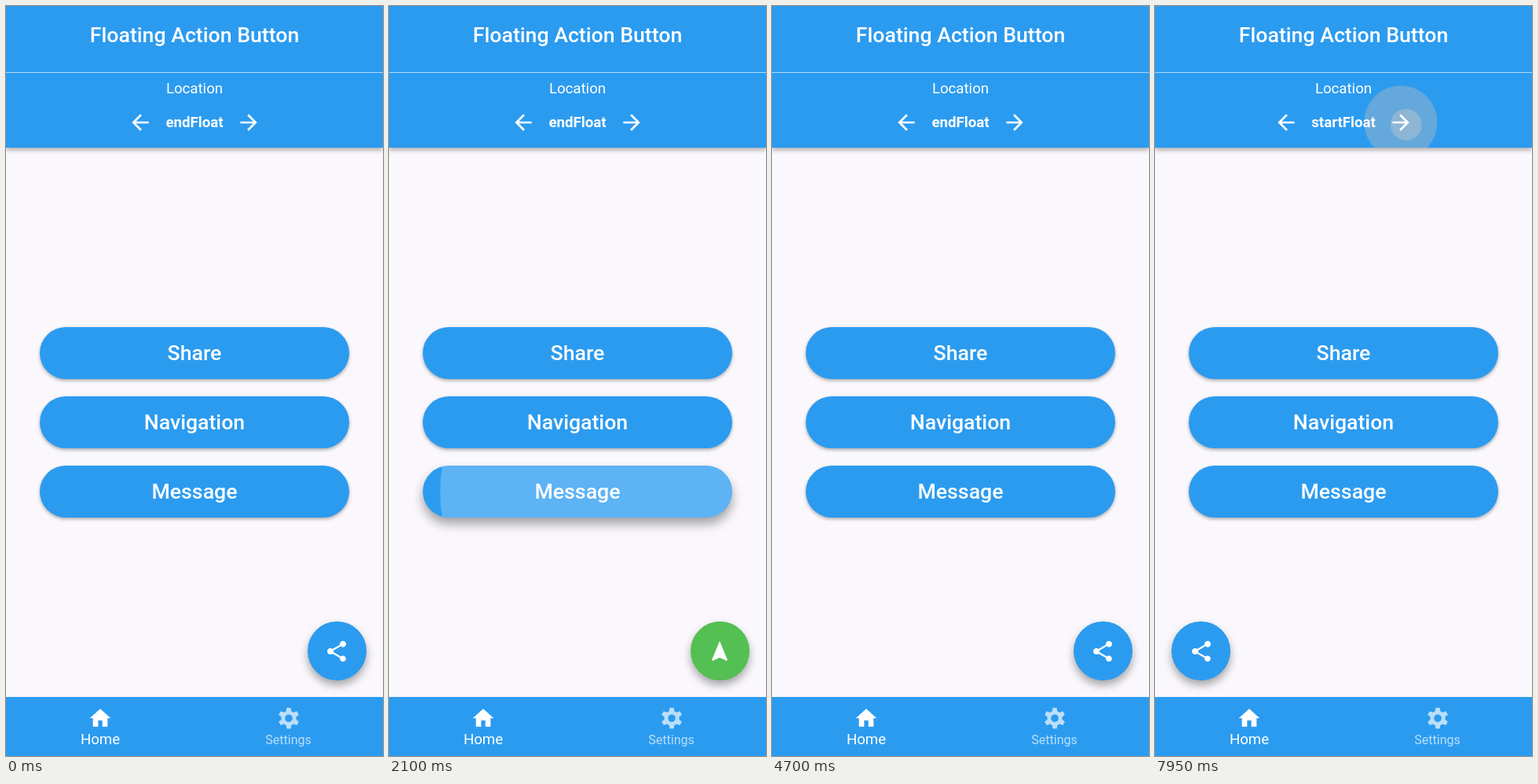
Recreate the animation shown at these times as an HTML page. Size 480x953 px, loop 8000 ms.

```html
<!DOCTYPE html>
<html lang="en">
<head>
<meta charset="utf-8">
<title>Floating Action Button</title>
<style>
  :root { --blue: #2b9bf0; --green: #54bf52; }
  html, body { margin: 0; width: 100%; height: 100%; overflow: hidden; }
  body { background: #faf8fc; color: #fff; font: 18.667px Roboto, sans-serif; }
  #stage { position: relative; width: 480px; height: 953px; overflow: hidden; }
  #stage div { position: absolute; }
  svg { display: block; width: 32px; height: 32px; fill: #fff; }

  .bar { left: 0; width: 480px; background: var(--blue); }
  .line { left: 0; width: 100%; text-align: center; white-space: nowrap; }
  #head { top: 0; height: 180px; overflow: hidden; isolation: isolate; box-shadow: 0 3px 6px rgba(0,0,0,.32); }
  #title { top: 17px; font-size: 26.667px; font-weight: 500; line-height: 40px; }
  #rule { top: 84px; left: 0; width: 100%; height: 1px; background: rgba(255,255,255,.62); }
  #place { top: 95px; line-height: 21px; }
  #row { top: 116px; left: 0; width: 100%; height: 64px; display: flex; justify-content: center; align-items: center; font-weight: 700; }
  #row .arrow { position: relative; width: 64px; height: 64px; }
  .arrow svg { margin: 16px; }
  .ink { left: 0; top: 0; border-radius: 50%; z-index: -1; }

  .button { left: 42.667px; width: 394.667px; height: 66.667px; border-radius: 34px; background: var(--blue); }
  .clip { inset: 0; border-radius: inherit; overflow: hidden; }
  .clip .ink { background: #fff; z-index: 0; }
  .button .line { top: 0; font-size: 26.667px; font-weight: 500; line-height: 67.5px; }

  #fab { box-shadow: 0 6px 11px rgba(0,0,0,.34); }
  #fabIcon { left: 21.333px; }
  #fabText { left: 64px; top: 0; line-height: 64px; font-weight: 500; letter-spacing: 1.6px; }

  #foot { top: 878.333px; height: 75px; }
  .tab { top: 0; width: 240px; height: 75px; }
  .tab svg { margin: 10.4px auto 0; }
</style>
</head>
<body>
<div id="stage">
  <div id="head" class="bar">
    <div id="title" class="line">Floating Action Button</div>
    <div id="rule"></div>
    <div id="place" class="line">Location</div>
    <div id="row">
      <div class="arrow"><svg viewBox="0 0 24 24"><path d="M20 11H7.83l5.59-5.59L12 4l-8 8 8 8 1.41-1.41L7.83 13H20v-2z"/></svg></div>
      <span id="label">endFloat</span>
      <div class="arrow">
        <div id="glow" class="ink" style="background:#bcbcbc"></div>
        <div id="splash" class="ink" style="background:#c8c8c8"></div>
        <svg viewBox="0 0 24 24"><path d="M12 4l-1.41 1.41L16.17 11H4v2h12.17l-5.58 5.59L12 20l8-8z"/></svg>
      </div>
    </div>
  </div>

  <div class="button" style="top:407.667px"><div class="clip"><div class="ink"></div></div><div class="line">Share</div></div>
  <div class="button" style="top:495.667px"><div class="clip"><div class="ink"></div></div><div class="line">Navigation</div></div>
  <div class="button" style="top:583.667px"><div class="clip"><div class="ink"></div></div><div class="line">Message</div></div>

  <div id="fab">
    <div id="fabIcon"><svg viewBox="0 0 24 24"><path id="fabPath"/></svg></div>
    <div id="fabText">Message</div>
  </div>

  <div id="foot" class="bar">
    <div class="tab" style="left:0">
      <svg viewBox="0 0 24 24"><path d="M10 20v-6h4v6h5v-8h3L12 3 2 12h3v8z"/></svg>
      <div class="line" style="top:43px;line-height:22px">Home</div>
    </div>
    <div class="tab" style="left:239.5px;opacity:.68">
      <svg viewBox="0 0 24 24" id="gear"><circle cx="12" cy="12" r="5.4" fill="none" stroke="#fff" stroke-width="3.6"/></svg>
      <div class="line" style="top:45px;line-height:20px;font-size:16px">Settings</div>
    </div>
  </div>
</div>

<script>
const LOOP = 8000;
const $ = id => document.getElementById(id);
const clamp = x => Math.min(1, Math.max(0, x));
const mix = (a, b, k) => a + (b - a) * k;

// cubic-bezier(.25, .1, .25, 1)
function ease(x) {
  if (x <= 0 || x >= 1) return clamp(x);
  let lo = 0, hi = 1, u;
  for (let i = 0; i < 24; i++) {
    u = (lo + hi) / 2;
    if (.75 * u * (1 - u) + u ** 3 < x) lo = u; else hi = u;
  }
  return .3 * u * (1 - u) ** 2 + 3 * u * u * (1 - u) + u ** 3;
}

const icons = {
  share: 'M18 16.08c-.76 0-1.44.3-1.96.77L8.91 12.7c.05-.23.09-.46.09-.7s-.04-.47-.09-.7l7.05-4.11c.54.5 1.25.81 2.04.81 1.66 0 3-1.34 3-3s-1.34-3-3-3-3 1.34-3 3c0 .24.04.47.09.7L8.04 9.81C7.5 9.31 6.79 9 6 9c-1.66 0-3 1.34-3 3s1.34 3 3 3c.79 0 1.5-.31 2.04-.81l7.12 4.16c-.05.21-.08.43-.08.65 0 1.61 1.31 2.92 2.92 2.92s2.92-1.31 2.92-2.92-1.31-2.92-2.92-2.92z',
  navigation: 'M12 2L4.5 20.29l.71.71L12 18l6.79 3 .71-.71z',
  message: 'M20 2H4c-1.1 0-1.99.9-1.99 2L2 22l4-4h14c1.1 0 2-.9 2-2V4c0-1.1-.9-2-2-2zm-2 12H6v-2h12v2zm0-3H6V9h12v2zm0-3H6V6h12v2z'
};

const buttonPresses = [
  { button: 1, down: 380, up: 630, x: 250, fab: 'navigation' },
  { button: 2, down: 1490, up: 2380, x: 344, fab: 'message' },
  { button: 0, down: 3290, up: 4130, x: 220, fab: 'share' }
];
const arrowPresses = [
  { down: 5600, up: 6100, dx: 4, dy: 6 },
  { down: 6500, up: 6965, dx: 9, dy: 4 },
  { down: 7520, up: 9000, dx: 12, dy: 5 }
];
const moves = [
  { at: 6100, from: 421.333, to: 240, label: 'centerFloat' },
  { at: 6965, from: 240, to: 58.667, label: 'startFloat' }
];

for (let i = 0; i < 6; i++) {
  const tooth = document.createElementNS('http://www.w3.org/2000/svg', 'path');
  tooth.setAttribute('d', 'M9.4 6.5L10 2.4Q10.1 2 10.5 2h3q.4 0 .5.4L14.6 6.5z');
  tooth.setAttribute('transform', `rotate(${i * 60} 12 12)`);
  $('gear').append(tooth);
}

const buttons = [...document.querySelectorAll('.button')];

function circle(el, x, y, r, alpha) {
  el.style.width = el.style.height = 2 * r + 'px';
  el.style.transform = `translate(${x - r}px, ${y - r}px)`;
  el.style.opacity = alpha;
}

// Growth takes a second while held, then finishes in `quick` ms after release.
function growth(t, p, quick) {
  const held = clamp((Math.min(t, p.up) - p.down) / 1000);
  return t > p.up ? clamp(held + (t - p.up) / quick) : held;
}

function drawButtons(t) {
  const w = 394.667, h = 66.667, reach = Math.hypot(w, h) / 2;
  buttons.forEach((el, i) => {
    const p = buttonPresses.find(q => q.button === i);
    const k = ease(growth(t, p, 225));
    const fade = clamp((t - p.down) / 75) * (1 - clamp((t - p.up - 225) / 150));
    circle(el.querySelector('.ink'), mix(p.x, w / 2, k), h / 2, mix(reach * .3, reach + 6.667, k), .235 * fade);
    const lift = ease((t - p.down) / 200) - ease((t - p.up) / 200);
    el.style.boxShadow = `0 ${mix(2, 8, lift)}px ${mix(4, 14, lift)}px rgba(0,0,0,${mix(.32, .36, lift)})`;
  });
}

function drawArrow(t) {
  const p = arrowPresses.findLast(q => t >= q.down);
  const fade = p ? 1 - clamp((t - p.up) / 200) : 0;
  const k = p ? growth(t, p, 35) : 0;
  circle($('glow'), 32, 32, 46.667, p ? .4 * clamp((t - p.down) / 200) * fade : 0);
  circle($('splash'), 32 + (p ? p.dx * (1 - k) : 0), 32 + (p ? p.dy * (1 - k) : 0), 46.667 * k, .4 * fade);
}

function drawFab(t) {
  const press = buttonPresses.findLast(q => t >= q.up);
  const kind = press ? press.fab : 'share';
  const wide = kind === 'message';
  const w = wide ? 178.667 : 74.667, h = wide ? 64 : 74.667;
  const morph = press ? ease((t - press.up) / 200) : 1;
  const corner = wide ? mix(32, 15, morph) : kind === 'share' && press ? mix(15, 37.333, morph) : 37.333;

  const move = moves.findLast(m => t >= m.at);
  let x = 421.333, scale = 1, turn = 0;
  if (move) {
    const k = clamp((t - move.at) / 400);
    const entering = k >= .5;
    x = entering ? move.to : move.from;
    scale = ease(entering ? 2 * k - 1 : 1 - 2 * k);
    turn = entering ? -90 * (1 - k) : 0;
  }
  const left = wide ? 280 : x - w / 2;
  Object.assign($('fab').style, {
    left: left + 'px', top: 857 - h + 'px', width: w + 'px', height: h + 'px',
    borderRadius: corner + 'px',
    background: kind === 'share' ? 'var(--blue)' : 'var(--green)',
    transform: `rotate(${turn}deg) scale(${scale})`
  });
  $('fabIcon').style.top = h / 2 - 16 + 'px';
  $('fabText').style.display = wide ? 'block' : 'none';
  $('fabPath').setAttribute('d', icons[kind]);
  $('label').textContent = move ? move.label : 'endFloat';
}

const start = performance.now();
function frame() {
  const t = (performance.now() - start) % LOOP;
  drawButtons(t);
  drawArrow(t);
  drawFab(t);
  requestAnimationFrame(frame);
}
frame();
</script>
</body>
</html>
```
